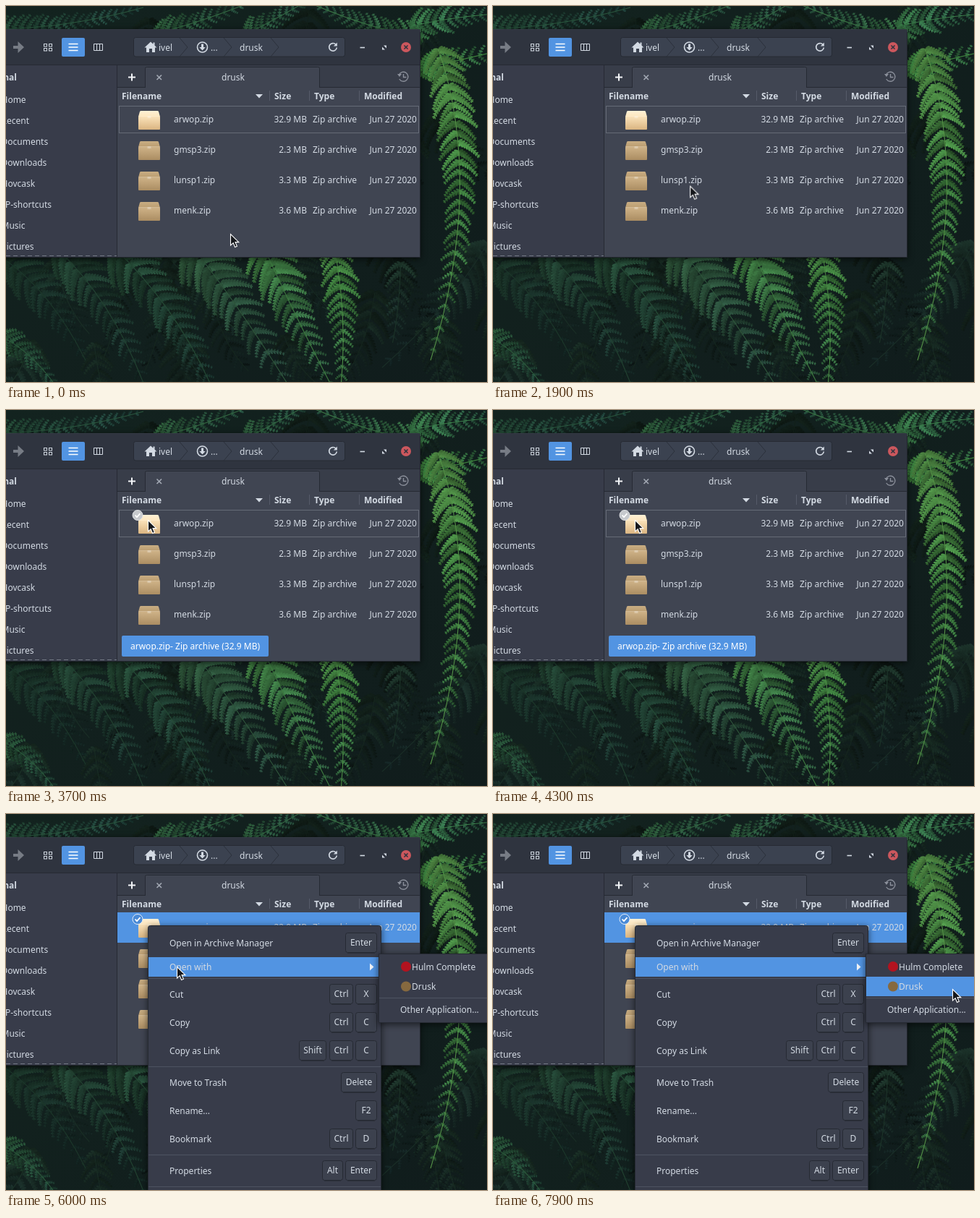
Write an HTML page with a canvas that moves like this. It is 665 px wide and 520 px high and loops after 8 s.

```html
<!DOCTYPE html>
<html lang="en">
<head>
<meta charset="utf-8">
<title>File manager</title>
<style>
html, body { margin: 0; width: 100%; height: 100%; overflow: hidden; background: #0e1a1c; }
canvas, svg { position: absolute; left: 0; top: 0; width: 665px; height: 520px; display: block; }
canvas { filter: blur(.5px); }
text { font: 12px "Noto Sans", "Open Sans", sans-serif; fill: #d3dae3; white-space: pre; }
.b { font-weight: bold; }
.mid { text-anchor: middle; }
.end { text-anchor: end; }
.w { fill: #fff; }
.ln { fill: none; stroke: #d3dae3; }
.shadow { filter: drop-shadow(0 2px 5px rgba(0,0,0,.6)); }
#cursor { animation: move 8s linear infinite; }
@keyframes move {
  0%, 18.75% { transform: translate(310px, 315px); animation-timing-function: ease-in-out; }
  30%, 37.5% { transform: translate(217px, 152px); animation-timing-function: ease-in-out; }
  43.75%, 66.25% { transform: translate(196px, 152px); }
  70% { transform: translate(233px, 208px); }
  71.25%, 77.5% { transform: translate(236px, 211px); }
  82.5% { transform: translate(487px, 204px); }
  85% { transform: translate(540px, 207px); }
  90% { transform: translate(612px, 238px); }
  95%, 100% { transform: translate(635px, 242px); }
}
</style>
</head>
<body>
<canvas id="ferns" width="665" height="520"></canvas>
<svg id="ui" viewBox="0 0 665 520"></svg>
<script>
// Fern wallpaper
const ctx = document.getElementById('ferns').getContext('2d');
let seed = 11;
const rnd = () => (seed = (seed * 16807) % 2147483647) / 2147483647;

function leaf(x, y, r, angle, color) {
  ctx.fillStyle = color;
  ctx.beginPath();
  ctx.ellipse(x + Math.cos(angle) * r, y + Math.sin(angle) * r, r, r * 0.5, angle, 0, 7);
  ctx.fill();
}

// One side branch: a tapering spine with lobes on both edges
function pinna(x, y, len, a, curl, tone) {
  const m = Math.max(4, Math.round(len / 4));
  const d = rnd() * 14 - 8;
  for (let k = 0; k < m; k++) {
    const u = k / m, b = a - curl * u;
    const px = x + Math.cos(b) * len * u, py = y + Math.sin(b) * len * u;
    const r = 0.8 + len * 0.075 * (1 - u * 0.7);
    leaf(px, py, r, b + 0.8, tone(d + rnd() * 5));
    leaf(px, py, r, b - 0.8, tone(d - 6 + rnd() * 5));
    leaf(px, py, r, b, tone(d));
  }
}

// Quadratic stem with paired branches that shorten to the tip
function frond(x0, y0, cx, cy, x1, y1, w, h, s, l) {
  const tone = t => d => `hsl(${h + t * 22} ${s}% ${Math.max(5, l * (1 - t * 0.2) + d * l / 34)}%)`;
  const n = Math.round(Math.hypot(x1 - x0, y1 - y0) / (4 + w * 0.23));
  for (let i = 0; i < n; i++) {
    const t = i / n, v = 1 - t;
    const x = v * v * x0 + 2 * v * t * cx + t * t * x1;
    const y = v * v * y0 + 2 * v * t * cy + t * t * y1;
    const dir = Math.atan2(v * (cy - y0) + t * (y1 - cy), v * (cx - x0) + t * (x1 - cx));
    const len = w * v ** 0.6 * (0.85 + rnd() * 0.3);
    for (const side of [-1, 1]) {
      pinna(x, y, len, dir + side * (1 + rnd() * 0.2), side * 0.3, tone(t));
    }
  }
  ctx.strokeStyle = tone(0)(3);
  ctx.lineWidth = 1.1;
  ctx.beginPath();
  ctx.moveTo(x0, y0);
  ctx.quadraticCurveTo(cx, cy, x1, y1);
  ctx.stroke();
}

const base = ctx.createLinearGradient(0, 0, 665, 520);
base.addColorStop(0, '#13231f');
base.addColorStop(1, '#101c1c');
ctx.fillStyle = base;
ctx.fillRect(0, 0, 665, 520);
for (let i = 0; i < 34; i++) {
  const x = rnd() * 700 - 20, y = i % 3 ? 320 + rnd() * 160 : rnd() * 300 - 30;
  const dx = rnd() * 160 - 60, dy = 60 + rnd() * 110;
  frond(x, y, x + dx * 0.2, y + dy * 0.6, x + dx, y + dy, 26 + rnd() * 26, 152, 28, 9 + rnd() * 6);
}
frond(-10, 345, 60, 390, 110, 490, 46, 150, 32, 15);
frond(70, 335, 150, 410, 195, 535, 46, 148, 32, 18);
frond(150, 335, 240, 420, 290, 540, 50, 146, 33, 20);
frond(255, 330, 320, 410, 400, 540, 54, 138, 30, 25);
frond(-10, 455, 40, 480, 75, 535, 26, 140, 35, 24);
frond(665, 330, 610, 420, 520, 500, 46, 158, 28, 13);
frond(-10, 32, 90, 30, 190, 2, 26, 148, 34, 23);
frond(205, 38, 260, 26, 335, -4, 28, 136, 34, 28);
frond(330, 40, 370, 20, 425, -12, 26, 138, 34, 28);
frond(575, 45, 500, 30, 425, -2, 28, 132, 34, 31);
frond(560, 28, 620, 14, 690, 10, 30, 134, 36, 33);
frond(570, 90, 610, 78, 700, 58, 34, 120, 36, 34);
frond(355, 330, 395, 420, 455, 535, 46, 122, 33, 34);
frond(452, 325, 474, 430, 462, 535, 36, 114, 34, 38);
frond(598, 60, 662, 250, 587, 490, 42, 110, 34, 39);

// Window
const T = (x, y, s, c = '') => `<text x="${x}" y="${y + 5}" class="${c}">${s}</text>`;
const R = (x, y, w, h, fill, more = '') => `<rect x="${x}" y="${y}" width="${w}" height="${h}" fill="${fill}" ${more}/>`;
const C = (x, y, r, fill, more = '') => `<circle cx="${x}" cy="${y}" r="${r}" fill="${fill}" ${more}/>`;
const P = (d, more) => `<path d="${d}" ${more}/>`;
const L = (d, color, w = 1) => P(d, `fill="none" stroke="${color}" stroke-width="${w}"`);
const G = (id, body, c = '') => `<g id="${id}" class="${c}">${body}</g>`;
const LIGHT = '#d3dae3', EDGE = '#262a33', PANEL = '#383c4a', BODY = '#404552', BLUE = '#5294e2';

const crumb = x => L(`M${x} 44L${x + 11} 57L${x} 70`, '#2b303b');
const box = (y, id) => `<g transform="translate(183 ${y - 12})">` +
  P('M3.5 0H26.5Q27.5 0 28 1L30 8H0L2 1Q2.500 0 3.500 0', `fill="url(#${id}Top)"`) +
  R(0, 7.5, 30, 18.5, `url(#${id})`, 'rx="1"') + L('M.5 7.500H29.500', '#fff3', 1) +
  P('M12.500 7h5v3.500l-1.200-.8-1.300.8-1.300-.8-1.200.8z', 'fill="#fff" fill-opacity=".3"') + '</g>';
const grad = (id, a, b) => `<linearGradient id="${id}" x2="0" y2="1"><stop stop-color="${a}"/><stop offset="1" stop-color="${b}"/></linearGradient>`;
const badge = (fill, rim) => C(182, 145.5, 7, fill, `stroke="${rim}"`) + L('M178.5 145.5l2.5 2.7 4.5-5', '#fff', 1.8);
const row = ([name, size], i) => {
  const y = 156 + i * 42;
  return box(y + 1, i ? 'dim' : 'lit') + T(232, y, name) + T(416, y, size, 'end') +
    T(424, y, 'Zip archive') + T(568, y, 'Jun 27 2020', 'end');
};

const header =
  P('M-10 32H569.5Q573 32 573 35.5V347.5H-10Z', 'fill="#2f343f"') +
  L('M0 32.5H569.5Q572.5 32.5 572.5 35.5', '#343944') +
  P('M10 55H16.5V49L25 57 16.5 65V59H10Z', 'fill="#777c85"') +
  [52.5, 59.5].map(x => [52.5, 58.5].map(y => R(x, y, 4, 3.5, 'none', `stroke="${LIGHT}"`)).join('')).join('') +
  R(77, 44, 32, 26, BLUE, 'rx="2"') + L('M86.5 52.5h13M86.5 57h13M86.5 61.5h13', '#fff', 1.6) +
  L('M121.5 52.5h12v9h-12zM125.5 52v10M129.5 52v10', LIGHT) +
  R(176.5, 43.5, 292, 26.5, '#3b4250', `rx="3" stroke="${EDGE}"`) + crumb(240) + crumb(301) + crumb(366) +
  P('M200 49.5L191.5 57.5H194V64H198V59H202V64H206V57.5H208.5L205.5 54.5V50.5H203.5V52.7Z', `fill="${LIGHT}"`) +
  T(211, 57, 'ivel') +
  C(271.5, 57, 7, 'none', `stroke="${LIGHT}" stroke-width="1.6"`) +
  P('M270 52.5h3V57h2.7L271.5 61.5 267.3 57H270Z', `fill="${LIGHT}"`) +
  T(283, 57, '...') + T(323, 57, 'drusk') +
  L('M456 53.3A5.3 5.3 0 1 0 457.3 57.5', LIGHT, 1.7) + P('M457.8 50.5V55.5H452.8Z', `fill="${LIGHT}"`) +
  L('M489.5 57.5h6.5', LIGHT, 1.6) +
  P('M522 54.5H526V58.5ZM520 56.5V60.5H524Z', `fill="${LIGHT}"`) +
  C(553, 57, 7, '#cc575d') + L('M550.5 54.5l5 5m0-5l-5 5', '#2f343f', 1.6);

const places = ['Home', 'Recent', 'Documents', 'Downloads', 'Hovcask', 'P-shortcuts', 'Music', 'Pictures'];
const sidebar = R(-10, 82, 163, 265, PANEL) + T(15, 98, 'Personal', 'b end') +
  places.map((s, i) => T(i === 5 ? -1 : -6.5, 129 + i * 29, s)).join('') +
  P('M0 345.5H153', 'stroke="#737884" stroke-dasharray="6 4"');

const files = [['arwop.zip', '32.9 MB'], ['gmsp3.zip', '2.3 MB'], ['lunsp1.zip', '3.3 MB'], ['menk.zip', '3.6 MB']];
const content =
  R(154, 82, 418, 265, BODY) + R(154, 82, 418, 30, '#383d49') + L('M154 112.5H572', EDGE) +
  P('M192.5 113V86.5Q192.5 84.5 194.5 84.5H431.5Q433.5 84.5 433.5 86.5V113', `fill="${BODY}" stroke="${EDGE}"`) +
  L('M169 98.5h10M174 93.5v10', '#f2f4f7', 2) + L('M208.5 95.5l6.5 6.5m0-6.5l-6.5 6.5', '#a4aab5', 1.6) +
  T(314, 98, 'drusk', 'mid') +
  L('M543.5 95A6.5 6.5 0 1 1 543.8 101M549.5 94v4.5h4', '#8b909b', 1.4) + P('M541 94h6l-3 4z', 'fill="#8b909b"') +
  T(160, 124, 'Filename', 'b') + T(371, 124, 'Size', 'b') + T(426, 124, 'Type', 'b') + T(495, 124, 'Modified', 'b') +
  P('M345 122H355L350 127.5Z', `fill="${LIGHT}"`) +
  L('M364.5 117v14M419.5 117v14M488.5 117v14', '#565b69') +
  G('picked', R(154, 136, 418, 42, BLUE)) +
  G('focus', R(156.5, 138.5, 414, 37, 'none', 'stroke="#8b909b" stroke-dasharray="1 1"')) +
  files.map(row).join('') +
  G('hint', badge('#c6c9cd', '#dfe1e4')) + G('check', badge('#4a8ad6', '#e6eefa')) +
  G('tip', R(160, 312, 203, 29, BLUE, 'rx="2"') + T(172, 326, 'arwop.zip- Zip archive (32.9 MB)', 'w'));

// Context menu
const CAPS = { Enter: [469, 43], Ctrl: [447, 32], Shift: [405, 37], Delete: [463, 49], Alt: [437, 28] };
const cap = (key, y) => {
  const [x, w] = CAPS[key] || [483, 29];
  return R(x + 0.5, y - 13.5, w, 27, '#3c414e', `rx="3" stroke="${EDGE}"`) +
    L(`M${x + 3} ${y + 14.5}h${w - 5}`, '#2b2f39') + T(x + w / 2 + 0.5, y - 1, key, 'mid');
};
const item = (y, label, ...keys) => T(226, y, label) + keys.map(k => cap(k, y)).join('');
const rule = y => L(`M197 ${y + 0.5}H518`, '#4d5361');
const menu = R(196.5, 154.5, 322, 380, PANEL, `rx="3" stroke="${EDGE}"`) +
  G('first', R(197, 159, 321, 39, BLUE)) + G('second', R(197, 198, 321, 27, BLUE)) +
  item(178, 'Open in Archive Manager', 'Enter') + item(211, 'Open with') +
  P('M503 206.5V216.5L508.5 211.5Z', 'fill="#eef1f5"') + rule(227) +
  item(249, 'Cut', 'Ctrl', 'X') + item(288, 'Copy', 'Ctrl', 'C') + item(327, 'Copy as Link', 'Shift', 'Ctrl', 'C') + rule(349) +
  item(371, 'Move to Trash', 'Delete') + item(410, 'Rename...', 'F2') + item(449, 'Bookmark', 'Ctrl', 'D') + rule(471) +
  item(493, 'Properties', 'Alt', 'Enter') + rule(515);
const submenu = R(515.5, 193.5, 160, 95, PANEL, `stroke="${EDGE}"`) +
  G('appA', R(516, 198, 160, 27, BLUE)) + G('appB', R(516, 225, 160, 27, BLUE)) +
  C(553, 211, 7, '#b3131f') + T(561, 211, 'Hulm Complete') + C(553, 238.5, 7, '#86693f') + T(561, 238, 'Drusk') +
  L('M516 254.5H665', '#4d5361') + T(545, 270, 'Other Application...');

document.getElementById('ui').innerHTML =
  '<defs>' + grad('lit', '#fbe3bb', '#dab581') + grad('litTop', '#fff1d6', '#fde6bd') +
  grad('dim', '#cfb388', '#ab8d62') + grad('dimTop', '#c8ad83', '#bb9d70') + '</defs>' +
  G('window', header + sidebar + content + L('M0 81.5H572M153.5 82V347', EDGE) + L('M572.5 36V347.5H0', '#22262e'), 'shadow') +
  G('menu', menu, 'shadow') + G('submenu', submenu, 'shadow') +
  G('cursor', P('M.5 .5V16L4.2 12.7 6.6 18.5 9.4 17.3 7 11.6H11.8Z', 'fill="#15171b" stroke="#fff" stroke-width="1.1"'));

// Visible spans in ms of the 8 s loop
const spans = {
  focus: [0, 4550], hint: [2250, 4550], tip: [2650, 4550],
  picked: [4550, 8000], check: [4550, 8000], menu: [4550, 8000],
  first: [5350, 5660], second: [5660, 8000], submenu: [5850, 8000],
  appA: [6760, 7050], appB: [7050, 8000]
};
const css = Object.entries(spans).map(([id, [from, to]]) => {
  const start = from ? `0% { visibility: hidden } ${from / 80}%` : '0%';
  const stop = to < 8000 ? `${to / 80}%, 100% { visibility: hidden }` : '100% { visibility: visible }';
  return `#${id} { animation: ${id} 8s step-end infinite } @keyframes ${id} { ${start} { visibility: visible } ${stop} }`;
});
document.head.appendChild(document.createElement('style')).textContent = css.join('\n');
</script>
</body>
</html>
```
